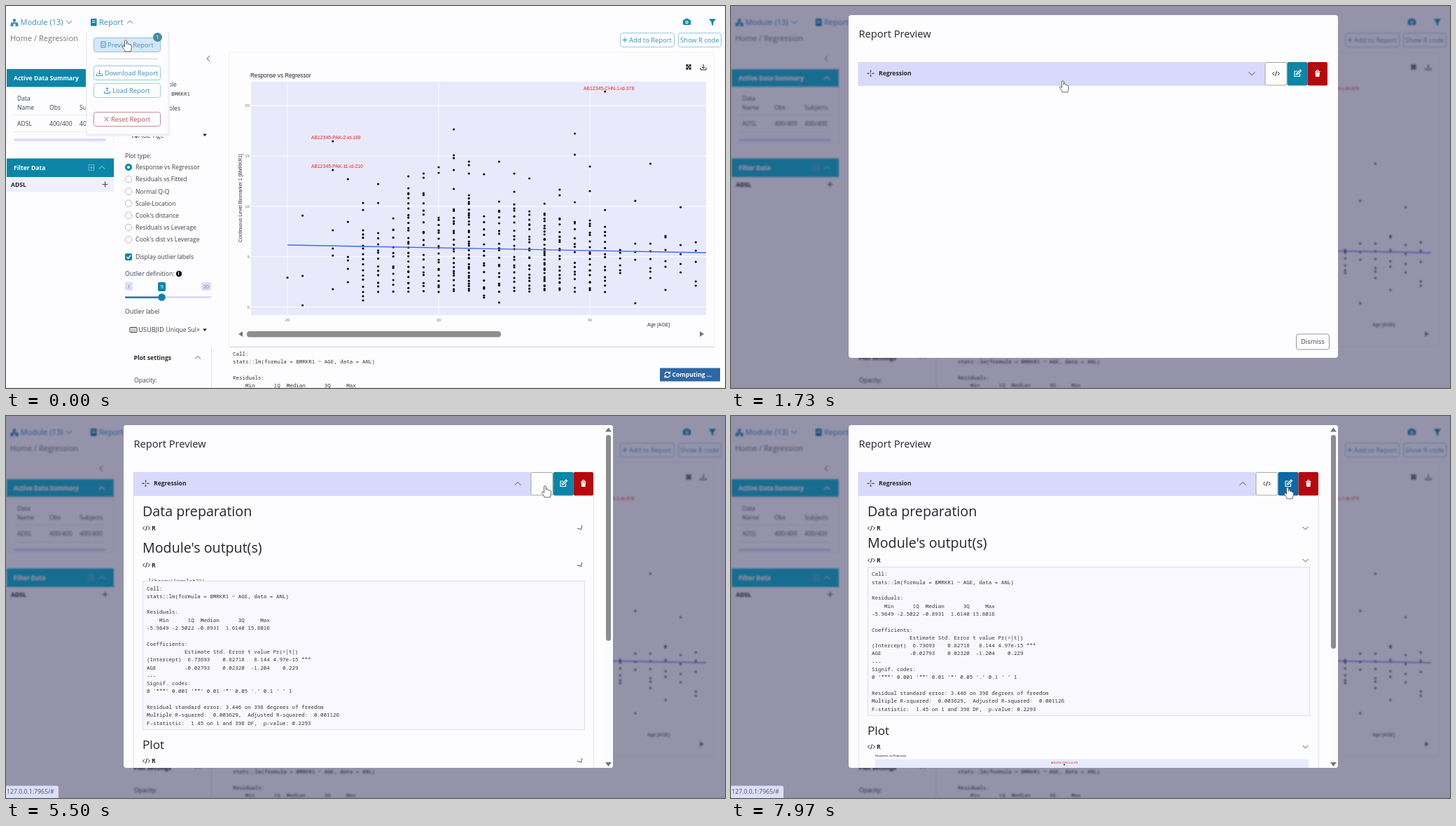
These frames come from a looping animation (1027x545 px, 8 s). An HTML page:

```html
<!DOCTYPE html>
<html lang="en">
<head>
<meta charset="utf-8">
<title>Report preview</title>
<style>
html,body{margin:0;width:100%;height:100%;overflow:hidden;background:#fdfdff}
svg{display:block;width:1027px;height:545px}
text{font-family:"Open Sans",sans-serif;white-space:pre}
.mono{font-family:"Noto Sans Mono","DejaVu Sans Mono",monospace}
.plot{font-family:"Liberation Sans",Arial,sans-serif}
.b{font-weight:700}
</style>
</head>
<body>
<svg id="stage" viewBox="0 0 1027 545" xmlns="http://www.w3.org/2000/svg"></svg>
<script>
const TEAL = '#0b86a8', INK = '#3c4048', BLUE = '#3d8fc0', LAV = '#dcdcfb', PANEL = '#e9e9fc', PAPER = '#fdfdff';

// y is the vertical middle of the line
const text = (x, y, s, size = 8.6, fill = INK, extra = '') =>
  `<text x="${x}" y="${(y + size * .36).toFixed(2)}" font-size="${size}" fill="${fill}" ${extra}>${s.replace(/&/g, '&amp;').replace(/</g, '&lt;')}</text>`;
const bold = (x, y, s, fill = '#25282e', size = 8.6) => text(x, y, s, size, fill, 'class="b"');
const sans = (x, y, s, size, fill, extra = '') => text(x, y, s, size, fill, 'class="plot" ' + extra);
const mono = (x, y, s, fill = '#333') => text(x, y, s, 7.53, fill, 'class="mono"');
const block = (x, y, s) => s.split('\n').map((l, i) => mono(x, y + i * 11.3, l)).join('');
const rect = (x, y, w, h, fill, extra = '') => `<rect x="${x}" y="${y}" width="${w}" height="${h}" fill="${fill}" ${extra}/>`;
const line = (d, stroke = INK, w = 1, extra = '') => `<path d="${d}" fill="none" stroke="${stroke}" stroke-width="${w}" ${extra}/>`;
const shape = (d, fill = INK) => `<path d="${d}" fill="${fill}"/>`;
const dot = (x, y, r, fill, extra = '') => `<circle cx="${x}" cy="${y}" r="${r}" fill="${fill}" ${extra}/>`;
const chevron = (x, y, up, c = '#555', s = 4) => line(`M${x - s} ${y + (up ? 2 : -2)}l${s} ${up ? -s : s}l${s} ${up ? s : -s}`, c);
const back = (x, y) => line(`M${x + 2} ${y - 4}l-4 4l4 4`, '#666');
const caret = (x, y) => shape(`M${x - 3} ${y - 1.5}h6l-3 3.5z`, '#222');
const button = (x, y, w, h, label, lx, color, border, fill = PAPER) =>
  rect(x + .5, y + .5, w - 1, h - 1, fill, `rx="3" stroke="${border}"`) + text(lx, y + h / 2, label, 9.4, color);
const tray = (x, y, dir, c) => line(`M${x - 4} ${y + 1}v3h8v-3M${x} ${y - 4}v6M${x - 2} ${y + (dir > 0 ? 0 : -2)}l2 ${2 * dir}l2 ${-2 * dir}`, c);

function sidebar() {
  const table = [[131.5, 'Data'], [145, 'Name', 'Obs', 'Subjects'], [168, 'ADSL', '400/400', '400/400']];
  return rect(2, 90, 152, 105, PAPER, 'stroke="#f0f0fb"')
    + rect(1, 90, 153, 25.5, TEAL, 'class="head"') + bold(11, 103, 'Active Data Summary', '#fff') + chevron(137, 103, true, '#e8f4f8')
    + table.map(([y, ...cells]) => cells.map((s, i) => text([16, 62, 105][i], y, s)).join('')).join('')
    + line('M11 155.5H143M11 179.5H143', '#ebebef') + rect(11, 189, 132, 4, LAV, 'rx="2"')
    + rect(1, 217.5, 153, 26.5, TEAL, 'class="head"') + bold(11, 230.5, 'Filter Data', '#fff')
    + rect(118, 226.5, 7.5, 8, 'none', 'stroke="#6cb6cc"') + line('M119.5 230.5h5M122 228v5', '#6cb6cc')
    + chevron(137, 230.5, true, '#bfe0ea') + rect(1, 244, 153, 21, '#efeffd', 'class="tint"')
    + bold(7, 254.5, 'ADSL') + line('M137.5 254.5h8M141.5 250.5v8', '#444')
    + back(136, 75) + back(289, 75);
}

function encodings() {
  const types = ['Response vs Regressor', 'Residuals vs Fitted', 'Normal Q-Q', 'Scale-Location',
    "Cook's distance", 'Residuals vs Leverage', "Cook's dist vs Leverage"];
  return text(170, 87, 'Encodings', 8.6, BLUE) + text(170, 100, 'Dataset:', 7, '#555') + mono(202, 100, 'ADSL')
    + text(171, 112, 'Response variable') + text(170, 125.5, 'Select variable:') + mono(236, 125.5, 'BMRKR1')
    + text(171, 146, 'Regressor variables') + text(170, 159, 'Select variables:')
    + line('M181 188v-8m-2 2l2-2l2 2M186 180v8m-2-2l2 2l2-2', '#222') + text(189, 184.5, 'AGE', 9.4)
    + text(210, 184.5, 'Age', 9) + caret(284, 184)
    + text(170, 214, 'Plot type:')
    + types.map((s, i) => dot(175, 230 + i * 17.2, i ? 4.8 : 3.6, PAPER,
        i ? 'stroke="#b9bcc6"' : `stroke="${TEAL}" stroke-width="3"`) + text(185, 230 + i * 17.2, s)).join('')
    + rect(170, 353, 10, 10, TEAL, 'rx="2"') + line('M172.5 358l2 2.3l3.5-4.5', '#fff', 1.4)
    + text(185, 358, 'Display outlier labels') + text(170, 382, 'Outlier definition:')
    + dot(247, 382, 4.2, '#111') + bold(245.6, 382, 'i', '#fff', 6.5)
    + rect(170, 394, 11, 12, LAV, 'rx="2" class="tint"') + text(173.5, 400, '1', 7, '#777')
    + rect(217, 394, 11, 13, TEAL, 'rx="2"') + text(220.2, 400.5, '9', 8, '#fff')
    + rect(279, 394, 14, 12, LAV, 'rx="2" class="tint"') + text(282, 400, '20', 7, '#777')
    + rect(170, 414, 123, 3, LAV) + rect(170, 414.5, 53, 2.5, '#2b77b3') + dot(222.5, 415.5, 5.3, TEAL)
    + text(170, 436, 'Outlier label')
    + rect(177, 458.5, 10, 7, PAPER, 'stroke="#333" rx="1"') + line('M179 461h6M179 463.5h6', '#333', 1, 'stroke-dasharray="1 .7"')
    + text(189, 462, 'USUBJID', 9.4) + text(228.5, 462, 'Unique Sul×') + caret(284, 462)
    + bold(182.5, 501.5, 'Plot settings') + chevron(274, 501.5, true) + text(183, 533.5, 'Opacity:')
    + line('M293.5 487V545', '#dfe0f4');
}

// age: [known heights, the last one bounds the rest], number of further points below it
const columns = {
  20: [[387.5]], 21: [[299, 385, 427]], 23: [[193, 234, 320, 346, 356, 404]],
  24: [[247, 308, 358, 363, 375, 394]], 25: [[281, 291, 420, 414, 320], 12], 26: [[254, 281, 324], 11],
  27: [[303, 319], 11], 28: [[243, 260, 267], 24], 29: [[239, 245, 267], 17], 30: [[230, 238, 302], 17],
  31: [[176, 213, 217, 234, 261, 290], 20], 32: [[222, 227, 239, 270], 30], 33: [[240, 416, 413, 300], 12],
  34: [[222, 423, 279, 292], 16], 35: [[239, 265, 283], 18], 36: [[246, 293], 21], 37: [[282, 296], 27],
  38: [[262, 270, 303], 18], 39: [[182, 212, 280, 308], 13], 40: [[229, 264, 306], 17],
  41: [[122, 291, 315], 12], 42: [[348, 352, 360, 370, 377, 381]], 43: [[278, 339, 362, 424, 351]],
  44: [[225, 339, 350, 361, 374, 379, 388]], 45: [[328, 330, 348, 364, 372, 405]],
  46: [[287, 341, 354, 368, 380]], 47: [[337, 365, 349, 393, 399]]
};
const ageX = a => 402 + (a - 20) * 21.6, valueY = v => 429.5 - v * 14.37;

function points() {
  let seed = 41, out = '';
  const random = () => (seed = seed * 16807 % 2147483647) / 2147483647;
  for (const [age, [known, more = 0]] of Object.entries(columns)) {
    const top = known[known.length - 1];
    // one jittered point per equal slice keeps each column evenly filled
    const ys = [...known, ...Array.from({length: more}, (_, i) => 408 - (408 - top) * ((i + random()) / more) ** 1.15)];
    out += ys.map(y => dot(ageX(+age).toFixed(1), y.toFixed(1), 1.6, '#050505')).join('');
  }
  return out;
}

function chart() {
  const labels = [[825, 117.5, 'CHN-1-id-378'], [436, 188, 'PAK-2-id-188'], [436, 229, 'PAK-11-id-210']];
  let s = rect(318.5, 66, 693, 420, PAPER, 'stroke="#f0f0fb" rx="3"') + line('M320 486.5H1012', LAV, 1.5, 'class="tint"')
    + line('M975 87l-3-3m0 2.5v-2.5h2.5M975 87l3-3m0 2.5v-2.5h-2.5M975 87l-3 3m0-2.5v2.5h2.5M975 87l3 3m0-2.5v2.5h-2.5', '#222', 1.3)
    + tray(996, 87, 1, '#222') + sans(349, 99.5, 'Response vs Regressor', 8.15, '#222')
    + rect(350, 108, 650, 333, PANEL, 'class="tint"');
  for (const v of [0, 5, 10, 15, 20])
    s += line(`M350 ${valueY(v)}H1000`, PAPER) + sans(348, valueY(v), '' + v, 5.8, '#777', 'text-anchor="end"');
  for (const a of [20, 30, 40])
    s += line(`M${ageX(a)} 108V441`, PAPER) + sans(ageX(a), 447.5, '' + a, 5.8, '#777', 'text-anchor="middle"');
  return s + points() + line('M402 341L1000 352', '#3f6bf0', 1.4)
    + labels.map(([x, y, id]) => sans(x, y, 'AB12345-' + id, 6.8, '#e8261c')).join('')
    + sans(916, 454.5, 'Age [AGE]', 6.8, '#333')
    + sans(0, 0, 'Continuous Level Biomarker 1 [BMRKR1]', 6.85, '#333', 'transform="translate(335 337) rotate(-90)"')
    + rect(344, 464, 363, 8.5, '#8e8e8e', 'rx="4"') + shape('M338 464v8l-6-4zM991 464v8l6-4z', '#777')
    + block(324, 496, 'Call:\nstats::lm(formula = BMRKR1 ~ AGE, data = ANL)\n\nResiduals:\n    Min      1Q  Median      3Q     Max');
}

const header = () => shape('M10 18.5h4v3.5h-1.4v1.5h4.4v2h.5v3.5h-4v-3.5h-2.9v3.5h-4v-3.5h.5v-2h3.5v-1.5h-.6z', BLUE)
  + text(20.5, 23, 'Module (13)', 11, BLUE) + chevron(90, 23, false, BLUE)
  + rect(121, 18, 8.5, 10.5, TEAL, 'rx="1"') + line('M123 21h4.5M123 23.5h4.5', '#fff') + text(133, 23, 'Report', 11, BLUE)
  + text(6, 46, 'Home / Regression', 11, '#777')
  + rect(967, 19.5, 11, 7.5, TEAL, 'rx="1.5"') + rect(970, 18, 5, 3, TEAL) + dot(972.5, 23.2, 2.2, '#fff') + dot(972.5, 23.2, 1.1, TEAL)
  + shape('M1004 18.5h10l-3.8 4.7v5l-2.4-1.7v-3.3z', TEAL)
  + button(877, 38, 78, 21, 'Add to Report', 890, BLUE, '#9cc6e2') + line('M880.5 48.5h7M884 45v7', BLUE)
  + button(960, 38, 62, 21, 'Show R code', 963, BLUE, '#9cc6e2') + line('M0 544.5H1027', '#e9ead2');

const menu = () => rect(114, 36, 120, 150, '#f0f0fc', 'rx="4"') + rect(116, 36, 115, 146, PAPER, 'rx="3"')
  + button(125, 45, 96, 21, 'Preview Report', 145, BLUE, '#8fbfe0', '#d5e8fb') + rect(136, 51, 6, 8, 'none', `stroke="${BLUE}"`)
  + line('M137.5 54h3M137.5 56.5h3', BLUE, .8) + line('M131 75.5H216', '#cfd2da')
  + button(125, 85, 96, 21, 'Download Report', 141, BLUE, '#9cc6e2') + tray(133.5, 95.5, 1, BLUE)
  + button(125, 110, 96, 21, 'Load Report', 152, BLUE, '#a6d2c4') + tray(144.5, 120.5, -1, BLUE)
  + button(125, 151, 96, 21, 'Reset Report', 150, '#b8504e', '#c78f8f') + line('M140.5 158.5l6 6m0-6l-6 6', '#b8504e')
  + dot(216.5, 44.5, 6.5, '#478da6') + text(214.5, 44.5, '1', 7, '#fff');

const computing = () => rect(934, 516.5, 86, 19, '#2d68a4')
  + line('M941 525.5a3.7 3.7 0 0 1 6.5-2M948.5 521.5v2.5h-2.5M948.5 526.5a3.7 3.7 0 0 1-6.5 2M941 530.5v-2.5h2.5', '#fff', 1.3)
  + bold(951.5, 526, 'Computing ...', '#fff', 8.6);

const prep = `require(nestcolor)
ADSL <- rADSL
ADRS <- rADRS
.raw_data <- list2env(list(ADSL = ADSL))
lockEnvironment(.raw_data) # @linksto .raw_data`;
const code = String.raw`library("ggplot2")
library("dplyr")
ANL_1 <- ADSL %>% dplyr::select(STUDYID, USUBJID, BMRKR1, AGE)
ANL <- ANL_1
ANL <- ANL %>% teal.data::col_relabel(BMRKR1 = "Continuous Level Biomarker 1", AGE = "Age")
fit <- stats::lm(BMRKR1 ~ AGE, data = ANL)
for (regressor in names(fit$contrasts)) {
    alts <- paste0(levels(ANL[[regressor]]), collapse = "|")
    names(fit$coefficients) <- gsub(paste0("^(", regressor, ")(", alts, ")$"), paste0("\\1", ": ", "\\2"), names(fit$coefficients))
}
fit_summary <- summary(fit)
fit_summary`;
const summary = `Call:
stats::lm(formula = BMRKR1 ~ AGE, data = ANL)

Residuals:
    Min      1Q  Median      3Q     Max
-5.9849 -2.5022 -0.8931  1.6140 15.8016

Coefficients:
            Estimate Std. Error t value Pr(>|t|)
(Intercept)  6.73693    0.82718   8.144 4.97e-15 ***
AGE         -0.02793    0.02320  -1.204    0.229
---
Signif. codes:
0 ‘***’ 0.001 ‘**’ 0.01 ‘*’ 0.05 ‘.’ 0.1 ‘ ’ 1

Residual standard error: 3.446 on 398 degrees of freedom
Multiple R-squared:  0.003629,  Adjusted R-squared:  0.001126
F-statistic:  1.45 on 1 and 398 DF,  p-value: 0.2293`;

const tag = (x, y, c = '#222') => line(`M${x + 3} ${y - 2.5}l-2.5 2.5l2.5 2.5M${x + 8} ${y - 2.5}l2.5 2.5l-2.5 2.5M${x + 6.5} ${y - 3.5}l-2 7`, c);
const turner = (x, y) => `<g class="turn" data-x="${x}" data-y="${y}">${line('M-4 -2L0 2L4 -2', '#555')}</g>`;
const section = (y, title, size, ry) => text(195, y, title, size, '#22252b') + tag(195, ry) + bold(208, ry, 'R') + turner(820.5, ry);
const clip = (id, x, y, w, h, extra = '') => `<clipPath id="${id}"><rect x="${x}" y="${y}" width="${w}" height="${h}" ${extra}/></clipPath>`;

function modal() {
  return clip('frame', 168, 13, 699, 489, 'rx="4"') + clip('bodyClip', 168, 113.5, 699, 0)
    + clip('prepClip', 183, 169, 656, 0) + clip('codeClip', 183, 215, 656, 0)
    + `<g clip-path="url(#frame)">` + rect(168, 13, 699, 489, PAPER) + text(182.5, 39.5, 'Report Preview', 14.7, '#22252b')
    + `<g clip-path="url(#bodyClip)">` + line('M182.5 113V1000M839.5 113V1000', '#dedff8') + section(135.5, 'Data preparation', 19.65, 160)
    + `<g clip-path="url(#prepClip)">${block(203, 182.5, prep)}</g>`
    + `<g id="output">` + section(181, "Module's output(s)", 19.65, 206)
    + `<g clip-path="url(#codeClip)">${block(203, 228.5, code)}</g></g>`
    + `<g id="result">` + rect(195.5, 215.5, 631, 212, '#f8f8fe', `stroke="${LAV}"`) + block(201, 225.7, summary)
    + section(449, 'Plot', 17.2, 472)
    + `<g id="image">` + sans(206, 484.7, 'Response vs Regressor', 4.2, '#222') + rect(206, 489.5, 619, 190, PANEL)
    + sans(457, 494.5, 'AB12345-CHN-1-id-378', 3.6, '#e8261c') + dot(476, 497.5, .9, '#111') + `</g></g></g>`
    + `<rect id="bar" x="182" y="80.5" height="33"/>`
    + line('M199.5 91.5v3M199.5 98v3M194.5 96.3h3M201.5 96.3h3', '#555', 1.6) + dot(199.5, 96.3, .8, '#555')
    + bold(211, 96.3, 'Regression')
    + `<g id="tools"><g id="cardArrow">${line('M-4.5 -2.2L0 2.2L4.5 -2.2', '#555')}</g>`
    + rect(763, 80.5, 31, 32.5, PAPER, 'stroke="#a9a98c" rx="2"') + `<g id="tag">${tag(773, 96.5)}</g>`
    + `<rect id="edit" x="794.5" y="80" width="29" height="33.5" rx="2"/>`
    + line('M809 93h-4v7.5h7.5v-4M807.5 98l.5-2l5-5l1.5 1.5l-5 5z', '#fff', 1.2)
    + rect(823.5, 80, 28.5, 33.5, '#b5090d', 'rx="2"')
    + line('M834 93.5h7.5M836.5 93v-1.5h2.5v1.5', '#fff') + shape('M834.5 94.5h6.5l-.6 6.5h-5.3z', '#fff')
    + `</g><g id="footer">${button(807, 467.5, 48, 23, 'Dismiss', 814, '#444', '#999')}</g>`
    + `<g id="scroll">` + rect(855, 13, 12, 489, '#fcfcfd') + shape('M860.5 16.5l4.5 6h-9zM860.5 500l4.5-6h-9z', '#777')
    + `<rect id="thumb" x="857" y="27" width="7" rx="3.5" fill="#8b8b90"/></g></g>`;
}

const cursors = `<g id="cursor"><path id="hand" d="M-1.5 1C-1.5-.8 1.3-.8 1.3 1V5.5C2-.2 4 5 4 6C4.8 5 6.3 5.5 6.3 6.7C7 6 8.3 6.5 8.3 8V11C8.3 13 7 14 7 16H-1C-1 14-4 11-4.5 9.3C-4.6 7.7-2.8 7.6-1.5 9.5Z" fill="#fff" stroke="#555" stroke-width=".9"/>`
  + `<path id="arrow" d="M0 0V13.5L3.2 10.5L5.3 15.3L7.3 14.4L5.2 9.8H9.5Z" fill="#fff" stroke="#555" stroke-width=".6"/></g>`;

document.getElementById('stage').innerHTML =
  `<filter id="soft" x="0" y="0" width="1" height="1"><feGaussianBlur stdDeviation=".9"/></filter>`
  + rect(0, 0, 1027, 545, PAPER) + `<g id="page">${header()}${sidebar()}${encodings()}${chart()}</g>`
  + `<g id="menu">${rect(170, 17, 14, 12, PAPER)}${chevron(177, 23, true, BLUE)}${menu()}${computing()}</g>`
  + `<g id="closed">${chevron(177, 23, false, BLUE)}</g>`
  + `<rect id="shade" width="1027" height="545" fill="#0a083a"/><g id="modal">${modal()}</g>`
  + `<g id="status"><path d="M0 527.5H72q3 0 3 3V545H0z" fill="#dcdefb"/>${text(1, 536, '127.0.0.1:7965/#', 8.7, '#555')}</g>` + cursors;

const el = id => document.getElementById(id);
const set = (id, name, value) => el(id).setAttribute(name, value);
const setAll = (selector, name, value) => document.querySelectorAll(selector).forEach(e => e.setAttribute(name, value));
const show = (id, on) => set(id, 'visibility', on ? 'visible' : 'hidden');
const move = (id, x, y) => set(id, 'transform', `translate(${x} ${y})`);
const setClip = (id, height) => el(id).firstChild.setAttribute('height', height);
const ramp = (t, start, length) => Math.min(1, Math.max(0, (t - start) / length));
const smooth = p => p * p * (3 - 2 * p);

// cubic-bezier(.25, .1, .25, 1)
function ease(p) {
  let lo = 0, hi = 1;
  for (let i = 0; i < 20; i++) {
    const s = (lo + hi) / 2;
    .75 * s * (1 - s) + s ** 3 < p ? lo = s : hi = s;
  }
  return .3 * lo * (1 - lo) ** 2 + 3 * lo * lo * (1 - lo) + lo ** 3;
}

const path = [[0, 171, 49], [230, 171, 49], [500, 326, 83], [900, 474, 107], [2500, 474, 107],
  [2900, 477, 107], [4250, 477, 107], [4750, 770, 100], [7400, 770, 100], [7700, 795, 102], [8000, 795, 102]];
function cursorAt(t) {
  const i = Math.max(1, path.findIndex(k => k[0] > t));
  const [t0, x0, y0] = path[i - 1], [t1, x1, y1] = path[i], p = smooth((t - t0) / (t1 - t0));
  return [x0 + (x1 - x0) * p, y0 + (y1 - y0) * p];
}

function render(t) {
  const open = ease(ramp(t, 2560, 350)), appear = ease(ramp(t, 510, 300)), dim = ramp(t, 330, 150);
  const shown = ease(ramp(t, 5467, 350)) - ease(ramp(t, 6950, 350));
  const turn = ramp(t, 5467, 200) - ramp(t, 6950, 200);
  const [x, y] = cursorAt(t);

  show('menu', t < 330);
  show('closed', t >= 330);
  set('shade', 'opacity', .43 * dim);
  // under the shade pale tints merge with the paper and the headers stay vivid
  setAll('.tint', 'opacity', 1 - dim);
  setAll('.head', 'fill', `rgb(${11 + 24 * dim} ${134 + 52 * dim} ${168 + 40 * dim})`);
  set('page', 'filter', t > 600 ? 'url(#soft)' : 'none');
  set('modal', 'opacity', appear);
  move('modal', 0, -50 * (1 - appear));

  const grown = Math.max(0, 577 * open - 340), overflow = grown > 0, inset = overflow ? 13 : 0;
  setClip('bodyClip', 577 * open + 311 * shown);
  setClip('prepClip', 73 * shown);
  setClip('codeClip', 150 * shown);
  move('output', 0, 73 * shown);
  move('result', 0, 223 * shown);
  move('image', 0, 88 * shown);
  move('footer', -inset, grown + 311 * shown);
  move('tools', -inset, 0);
  set('bar', 'width', 581 - inset);
  set('bar', 'stroke', t > 2500 && t < 5430 ? '#b5d8f6' : '#d8d9fc');
  set('bar', 'fill', t > 2560 && t < 4650 ? '#d3dcfc' : '#d8d9fc');
  set('cardArrow', 'transform', `translate(744 96.5) rotate(${-180 * ramp(t, 2560, 200)})`);
  for (const g of document.querySelectorAll('.turn'))
    g.setAttribute('transform', `translate(${g.dataset.x} ${g.dataset.y}) rotate(${-180 * turn})`);
  set('scroll', 'display', overflow ? 'inline' : 'none');
  set('thumb', 'height', 226900 / (489 + 255 * grown / 237 + 311 * shown));

  set('tag', 'opacity', x > 750 && x < 781 ? 0 : 1);
  set('edit', 'fill', x > 782 ? '#0a69a6' : TEAL);
  show('status', t > 4650);
  move('cursor', x, y);
  const pointing = t < 280 || t > 780;
  show('hand', pointing);
  show('arrow', !pointing);
}

const start = performance.now();
function tick() {
  render((performance.now() - start) % 8000);
  requestAnimationFrame(tick);
}
tick();
</script>
</body>
</html>
```
